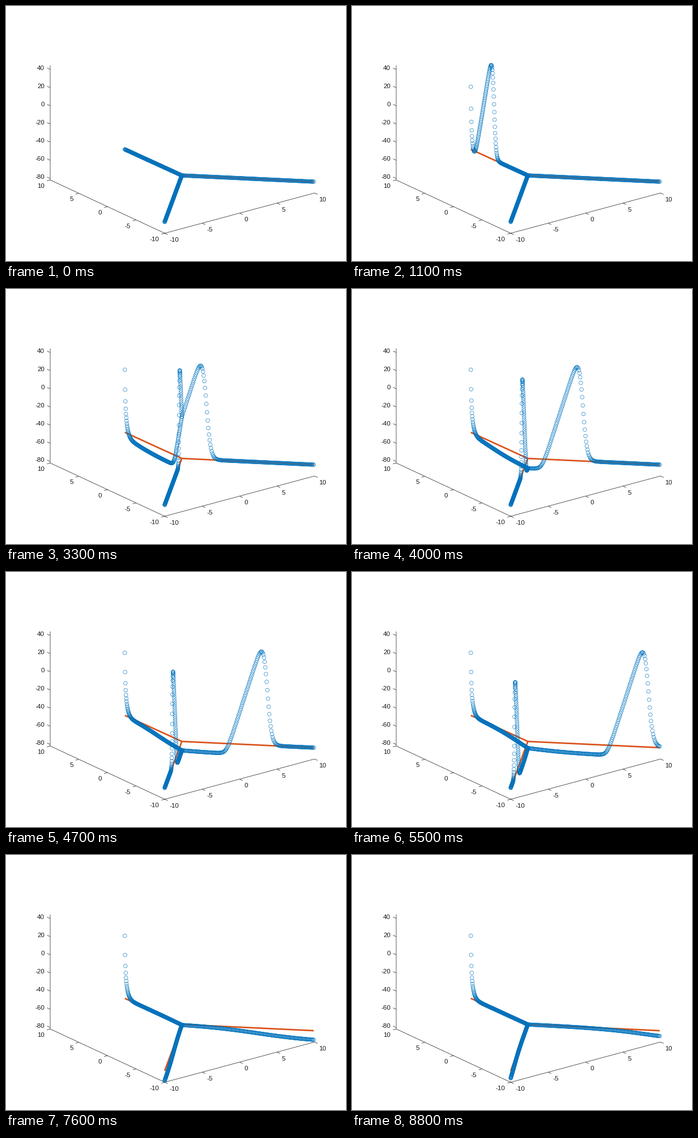
A matplotlib script for the animation above (8900 ms loop, 600 by 450 pixels).

```python
import numpy as np
import matplotlib.pyplot as plt
from matplotlib.animation import FuncAnimation

W, H, DPI = 600, 450, 100
PX = 72 / DPI          # points per pixel
FRAMES, STEP = 89, 100
BLUE, ORANGE, DARK, INK = "#0072BD", "#D95319", "#262626", "#181818"
NODES = 200            # per branch

START, FORK = np.array([209.7, 253.0]), np.array([310.3, 299.0])
RIGHT, FRONT = np.array([543.0, 310.0]), np.array([280.0, 381.0])

n = np.arange(NODES)
s = n / (NODES - 1)


def sigmoid(x):
    return 1 / (1 + np.exp(-x))


def pulse(t):
    """Spike height in pixels, t frames after the local peak."""
    upstroke = sigmoid(2.1 * (t + 1.38))
    fall = 11 * np.logaddexp(0, 24 * (8 - t) / 11)     # straight fall, soft landing
    dip = 18 * sigmoid((30 - t) / 6)                   # undershoot that slowly recovers
    return upstroke * (fall - dip)


def arrival(begin, travel, hurry):
    """Peak time at each node; the spike hurries a little at a closed end."""
    return begin + travel * s - hurry * np.exp((s - 1) * 23)


FORK_T = 28.8
peak_trunk = 1.2 + 27.6 * s + 0.8 * np.exp(-s * 20)
peak_right = arrival(FORK_T, 30.3, 0.4)
peak_front = arrival(FORK_T, 35.6, 0.7)


def trunk_height(t):
    """Travelling spike plus the steady drive held on the first node."""
    v = pulse(t - peak_trunk) * (1 - np.exp(-t * t / 1.5))
    reach = 7 - 1.8 * np.exp(-((t - 9) / 8) ** 2)
    drive = (62 * np.exp(-n / reach) + 48.5 * np.exp(-n / 1.35)) * (1 - np.exp(-1.2 * t))
    up = v + drive * (1 - 0.89 * np.clip(v / 165, 0, 1))
    down = v * (1 - np.exp(-n / 6)) + drive
    return np.where(v > 0, up, down)


def right_height(t):
    v = pulse(t - peak_right)
    return v + 0.07 * np.maximum(v, 0) * np.exp((s - 1) * 15)


def front_height(t):
    return pulse(t - peak_front)


BRANCHES = (START, FORK), (FORK, RIGHT), (FORK, FRONT)
BASE = np.vstack([a + np.outer(s, b - a) for a, b in BRANCHES])

fig = plt.figure(figsize=(W / DPI, H / DPI), dpi=DPI, facecolor="white")
ax = fig.add_axes([0, 0, 1, 1])
ax.axis("off")


def stroke(xs, ys, color=DARK, width=0.75, z=1):
    ax.plot(xs, ys, color=color, lw=width * PX, zorder=z,
            solid_capstyle="butt", solid_joinstyle="round")


def tick(p, d):
    stroke([p[0], p[0] + d[0]], [p[1], p[1] + d[1]])


def label(x, y, value, side):
    ax.text(x, y, str(value), ha=side, va="center_baseline", color=INK,
            family="Liberation Sans", fontsize=11.5 * PX)


LEFT, NEAR, FAR = np.array([78, 307]), np.array([280, 401]), np.array([544.5, 330])
stroke([78, 78, 280, 544.5], [105, 307, 401, 330])
for k in range(5):
    p = LEFT + (NEAR - LEFT) * k / 4
    tick(p, (-5.8, 1.6))
    label(p[0] - 10, p[1] + 10, 10 - 5 * k, "right")
    p = NEAR + (FAR - NEAR) * k / 4
    tick(p, (5.4, 2.5))
    label(p[0] + 8, p[1] + 11, 5 * k - 10, "left")
for k in range(7):
    y = 112 + 32.05 * k
    tick((78, y), (-5.4, -2.5))
    label(68, y - 3, 40 - 20 * k, "right")

for a, b in BRANCHES:
    stroke([a[0], b[0]], [a[1], b[1]], ORANGE, 2.7, 2)

dots = ax.scatter(BASE[:, 0], BASE[:, 1], s=(6.5 * PX) ** 2, facecolors="none",
                  edgecolors=BLUE, linewidths=0.62 * PX, zorder=3)
ax.set_xlim(0, W)
ax.set_ylim(H, 0)


def draw(frame):
    t = float(frame)
    rise = np.concatenate([trunk_height(t), right_height(t), front_height(t)])
    dots.set_offsets(np.column_stack([BASE[:, 0], BASE[:, 1] - rise]))
    return dots,


anim = FuncAnimation(fig, draw, frames=FRAMES, interval=STEP, repeat=True,
                     repeat_delay=0, blit=False)
plt.show()
```
